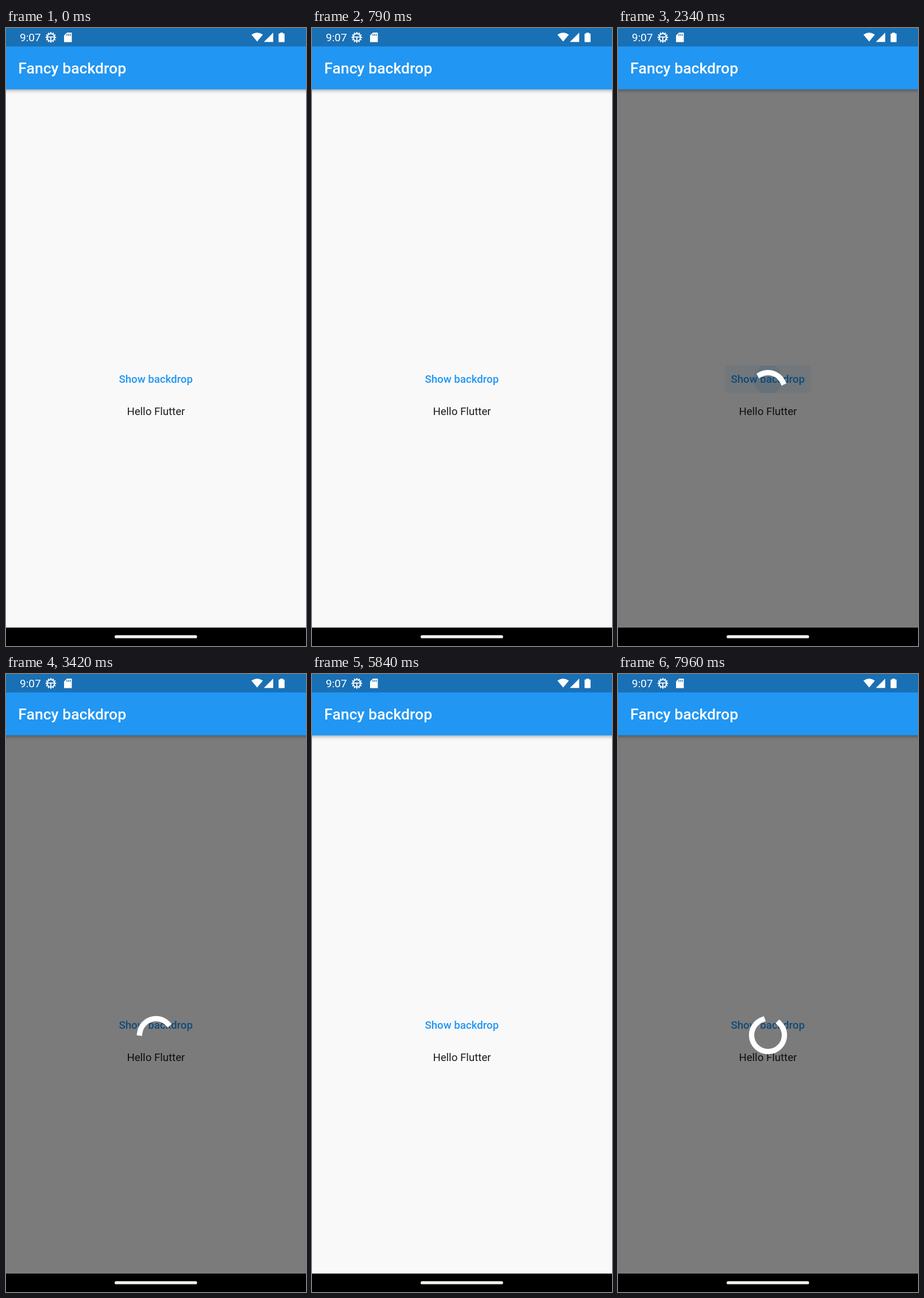
Recreate the animation shown at these times as an HTML page with a canvas. Size 522 by 1073 pixels, loop 8 s.

```html
<!DOCTYPE html>
<html lang="en">
<head>
<meta charset="utf-8">
<title>Fancy backdrop</title>
<style>
  html, body { margin: 0; width: 100%; height: 100%; overflow: hidden; background: #000; }
  canvas { display: block; width: 522px; height: 1073px; }
</style>
</head>
<body>
<canvas id="stage" width="522" height="1073"></canvas>
<script>
const ctx = document.getElementById('stage').getContext('2d');
const W = 522, BAR_TOP = 32, BAR_END = 106.3, BODY_END = 1041;
const DP = 1.3292; // stage pixels per logical pixel
const LOOP = 8000, SPIN = 1200, INK_FADE = 200, HOLD = 155;
const BLUE = '#2196f3';
// The backdrop appears and disappears at once, when a tap is released.
const SHOWS = [{ from: 2331, to: 4880 }, { from: 7372, to: LOOP }];
const BUTTON = { x: 186, y: 586, w: 150, h: 48 };
const TAP = { x: 327.5, y: 340, at: 4734, until: 4880, speed: 0.774 };

const clamp = v => Math.max(0, Math.min(1, v));
const ramp = (t, from, length) => clamp((t - from) / length);
const rad = deg => deg * Math.PI / 180;

function rect(color, x, y, w, h) {
  ctx.fillStyle = color;
  ctx.fillRect(x, y, w, h);
}

function disc(color, x, y, r) {
  ctx.fillStyle = color;
  ctx.beginPath();
  ctx.arc(x, y, r, 0, 2 * Math.PI);
  ctx.fill();
}

function poly(color, points) {
  ctx.fillStyle = color;
  ctx.beginPath();
  points.forEach(([x, y]) => ctx.lineTo(x, y));
  ctx.fill();
}

function pill(color, x, y, w, h, r) {
  ctx.fillStyle = color;
  ctx.beginPath();
  ctx.roundRect(x, y, w, h, r);
  ctx.fill();
}

function label(text, x, y, size, weight, color, align = 'left') {
  ctx.font = `${weight} ${size}px Roboto, sans-serif`;
  ctx.textAlign = align;
  ctx.fillStyle = color;
  ctx.fillText(text, x, y);
}

function drawGear(x, y) {
  ctx.save();
  ctx.translate(x, y);
  ctx.strokeStyle = '#fff';
  ctx.lineWidth = 1.8;
  ctx.beginPath();
  ctx.arc(0, 0, 6.4, 0, 2 * Math.PI);
  ctx.moveTo(-6, -0.6);
  ctx.lineTo(6, -0.6);
  ctx.moveTo(0, -0.6);
  ctx.lineTo(0, 6);
  ctx.stroke();
  for (let i = 0; i < 12; i++) {
    ctx.rotate(Math.PI / 6);
    rect('#fff', -1.1, -9.2, 2.2, 2.6);
  }
  ctx.restore();
}

function drawStatus() {
  rect('#1a70b5', 0, 0, W, BAR_TOP);
  label('9:07', 24, 23.2, 19, 400, '#fff');
  drawGear(78, 16.3);

  poly('#fff', [[106, 8], [114.5, 8], [114.5, 24.5], [101, 24.5], [101, 13]]);
  for (const x of [105.3, 108.2, 111.1]) rect('#1a70b5', x, 10.3, 1.4, 3.3);

  ctx.fillStyle = '#fff';
  ctx.beginPath();
  ctx.moveTo(437, 23.5);
  ctx.lineTo(427, 11.6);
  ctx.quadraticCurveTo(437, 4.4, 447, 11.6);
  ctx.fill();
  poly('#fff', [[465, 8], [465, 24.3], [448.7, 24.3]]);
  pill('#fff', 474.3, 9.6, 10.4, 15, 1.2);
  rect('#fff', 477.2, 8, 4.6, 2);
}

function drawBar() {
  const shadows = [[2.7, 6, 0.27], [0, 8, 0.08]];
  ctx.save();
  for (const [offset, blur, alpha] of shadows) {
    ctx.shadowOffsetY = offset;
    ctx.shadowBlur = blur;
    ctx.shadowColor = `rgba(0,0,0,${alpha})`;
    rect(BLUE, -10, 0, W + 20, BAR_END);
  }
  ctx.restore();
  label('Fancy backdrop', 21.3, 79.3, 26.6, 500, '#fff');
}

// Highlight and splash while the button is held, fading after its release.
function drawButtonInk(t, released) {
  const pressed = released - HOLD;
  if (t < pressed || t > released + INK_FADE) return;
  const fade = 1 - ramp(t, released, INK_FADE);
  const held = Math.min(t, released) - pressed;
  const after = Math.max(0, t - released);
  const radius = (held * 0.06 + after) * DP;
  const { x, y, w, h } = BUTTON;
  ctx.save();
  ctx.beginPath();
  ctx.roundRect(x, y, w, h, 5);
  ctx.clip();
  rect(`rgba(33,150,243,${0.12 * fade * held / INK_FADE})`, x, y, w, h);
  disc(`rgba(33,150,243,${0.12 * fade})`, x + w / 2, y + h / 2, radius);
  ctx.restore();
}

// The backdrop's own ink is painted on the page, below the dark layer.
function drawBackdropInk(t) {
  if (t < TAP.at || t >= TAP.until) return;
  const age = t - TAP.at;
  rect(`rgba(188,188,188,${0.4 * clamp(age / INK_FADE)})`, 0, BAR_TOP, W, BODY_END - BAR_TOP);
  disc('rgba(200,200,200,0.4)', TAP.x, TAP.y, age * TAP.speed);
}

function drawPage(t) {
  rect('#f9f9fa', 0, BAR_TOP, W, BODY_END - BAR_TOP);
  for (const { from } of SHOWS) drawButtonInk(t, from);
  drawBackdropInk(t);
  label('Show backdrop', 260.7, 616, 18.65, 500, BLUE, 'center');
  label('Hello Flutter', 260.9, 672, 18.65, 400, '#1c1c1c', 'center');
}

function drawSpinner(elapsed) {
  const p = (elapsed % SPIN) / SPIN;
  const wave = 1 - Math.abs(2 * p - 1);
  const start = 150 * p - 120 + 210 * ramp(p, 0.5, 0.5);
  const sweep = 90 + 210 * wave;
  ctx.strokeStyle = '#fff';
  ctx.lineWidth = 7 * DP;
  ctx.lineCap = 'square';
  ctx.beginPath();
  ctx.arc(261, 627, 21.5 * DP, rad(start), rad(start + sweep));
  ctx.stroke();
  ctx.lineCap = 'butt';
}

function drawBackdrop(t) {
  const show = SHOWS.find(({ from, to }) => t >= from && t < to);
  if (!show) return;
  rect('rgba(0,0,0,0.505)', 0, BAR_TOP, W, BODY_END - BAR_TOP);
  drawSpinner(t - show.from);
}

function drawNav() {
  rect('#000', 0, BODY_END, W, 1073 - BODY_END);
  pill('#f2f1ef', 189, 1054.3, 143.5, 5.3, 2.6);
}

const begin = performance.now();

function frame() {
  const t = (performance.now() - begin) % LOOP;
  drawPage(t);
  drawBackdrop(t);
  drawBar();
  drawStatus();
  drawNav();
  requestAnimationFrame(frame);
}
frame();
</script>
</body>
</html>
```
